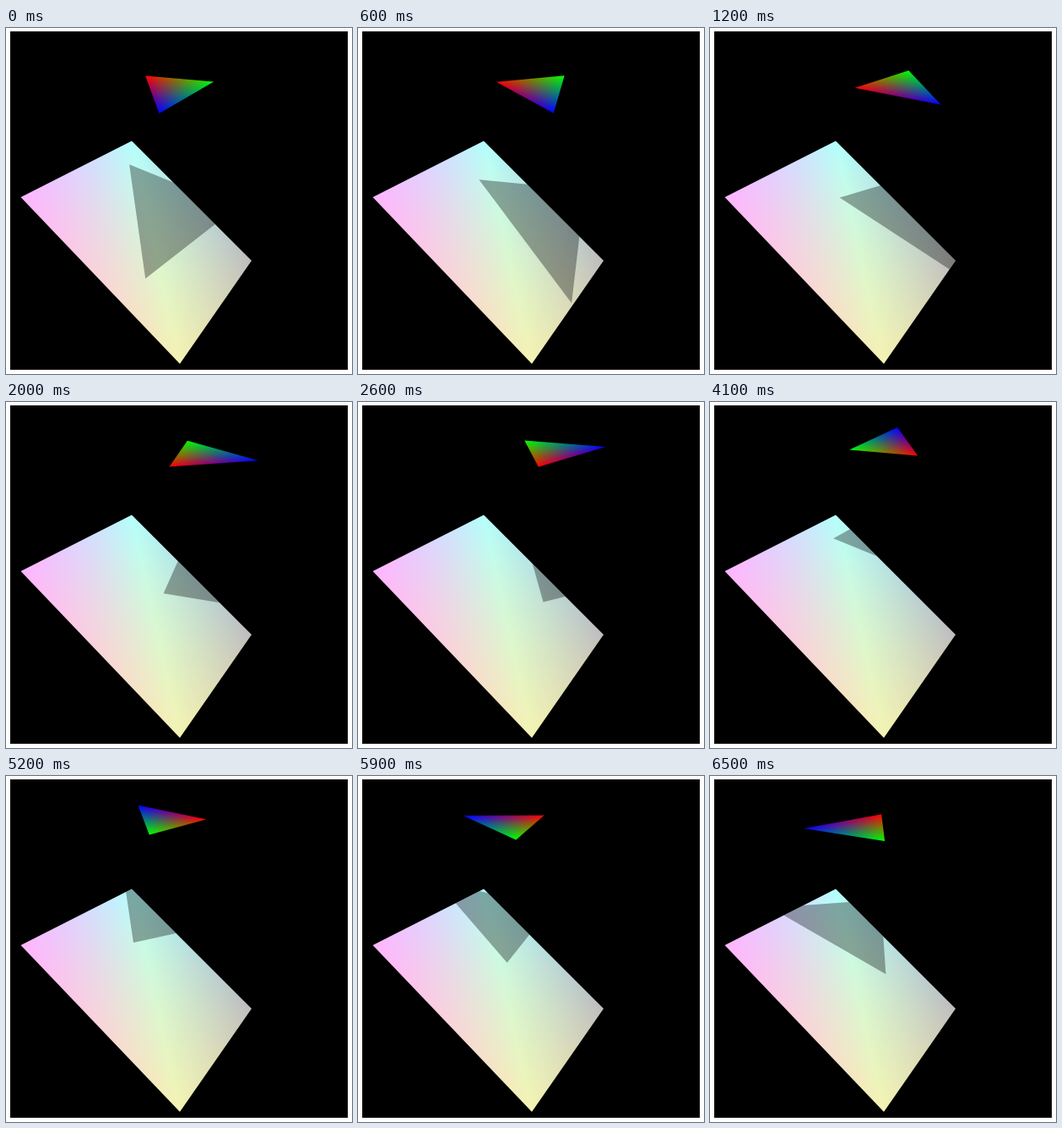
These frames come from a looping animation (410 px wide and 409 px high, 6.6 s). An HTML page with a canvas:

```html
<!DOCTYPE html>
<html lang="en">
<head>
<meta charset="utf-8">
<title>Turning triangle and its shadow</title>
<style>
html, body { margin: 0; width: 100%; height: 100%; overflow: hidden; background: #fff; }
canvas { display: block; }
</style>
</head>
<body>
<canvas id="stage" width="410" height="409"></canvas>
<script>
const W = 410, H = 409, STEP = 100, STEPS = 66;
const TURN = Math.PI / 41; // angle per step
const rad = Math.PI / 180;
const ctx = document.getElementById('stage').getContext('2d');

// Floor corners: screen position, depth, colour.
const floor = [
  { x: 149, y: 133.5, w: 1.0385, c: [179, 255, 253] },
  { x: 17.5, y: 200, w: 0.767, c: [255, 180, 255] },
  { x: 206, y: 397, w: 0.7285, c: [243, 243, 179] },
  { x: 291, y: 275, w: 1, c: [190, 188, 190] }
];

// Triangle corners in polar form on the turning plane.
const corners = [
  { r: 1, a: 192.7 * rad, c: '#f00' },
  { r: 1, a: 12.7 * rad, c: '#0f0' },
  { r: 2.248, a: 102.3 * rad, c: '#00f' }
];

// Perspective views of the turning plane: in the air and cast on the floor.
function inAir(x, y) {
  const w = 1 - 0.0707 * y;
  return { x: 205 + 41.5 * x / w, y: 60 + 15.8 * y / w };
}
function onFloor(x, y) {
  const w = 1 - 0.045 * x - 0.112 * y;
  return { x: 205 + 64.5 * x / w, y: 185.2 + (16.6 * x + 42.8 * y) / w };
}

function trace(g, pts) {
  g.beginPath();
  pts.forEach(p => g.lineTo(p.x, p.y));
  g.closePath();
}

function cross(a, b, x, y) {
  return (b.x - a.x) * (y - a.y) - (b.y - a.y) * (x - a.x);
}

// Depth-correct blend of three corner colours at one pixel.
function blend([a, b, c], x, y) {
  const ka = cross(b, c, x, y) / a.w;
  const kb = cross(c, a, x, y) / b.w;
  const kc = cross(a, b, x, y) / c.w;
  const sum = ka + kb + kc;
  return a.c.map((v, i) => (ka * v + kb * b.c[i] + kc * c.c[i]) / sum);
}

function paintFloor() {
  const cv = document.createElement('canvas');
  cv.width = W;
  cv.height = H;
  const g = cv.getContext('2d');
  const img = g.createImageData(W, H);
  const [a, b, c, d] = floor;
  const left = [a, b, c], right = [a, c, d];
  for (let y = 130; y < 400; y++) {
    for (let x = 14; x < 295; x++) {
      const px = x + 0.5, py = y + 0.5;
      const side = cross(a, c, px, py) > 0 ? left : right;
      img.data.set([...blend(side, px, py), 255], (y * W + x) * 4);
    }
  }
  g.putImageData(img, 0, 0);
  return cv;
}
const floorImage = paintFloor();

// Sum of three fades, each from a corner to its opposite edge.
function paintTriangle(pts) {
  ctx.save();
  ctx.globalCompositeOperation = 'lighter';
  pts.forEach((p, i) => {
    const q = pts[(i + 1) % 3], s = pts[(i + 2) % 3];
    const dx = s.x - q.x, dy = s.y - q.y;
    const k = ((p.x - q.x) * dx + (p.y - q.y) * dy) / (dx * dx + dy * dy);
    const fade = ctx.createLinearGradient(p.x, p.y, q.x + k * dx, q.y + k * dy);
    fade.addColorStop(0, corners[i].c);
    fade.addColorStop(1, '#000');
    ctx.fillStyle = fade;
    trace(ctx, pts);
    ctx.fill();
  });
  ctx.restore();
}

function draw(step) {
  const turned = view => corners.map(({ r, a }) => {
    const t = a - step * TURN;
    return view(r * Math.cos(t), r * Math.sin(t));
  });

  ctx.fillStyle = '#fff';
  ctx.fillRect(0, 0, W, H);
  ctx.fillStyle = '#000';
  ctx.fillRect(5, 4, 400, 400);

  ctx.save();
  trace(ctx, floor);
  ctx.clip();
  ctx.drawImage(floorImage, 0, 0);
  trace(ctx, turned(onFloor));
  ctx.fillStyle = 'rgba(0, 0, 0, 0.34)';
  ctx.fill();
  ctx.restore();

  paintTriangle(turned(inAir));
}

const start = performance.now();
function tick() {
  const t = Math.max(0, performance.now() - start);
  draw(Math.floor(t / STEP) % STEPS);
  requestAnimationFrame(tick);
}
tick();
</script>
</body>
</html>
```
